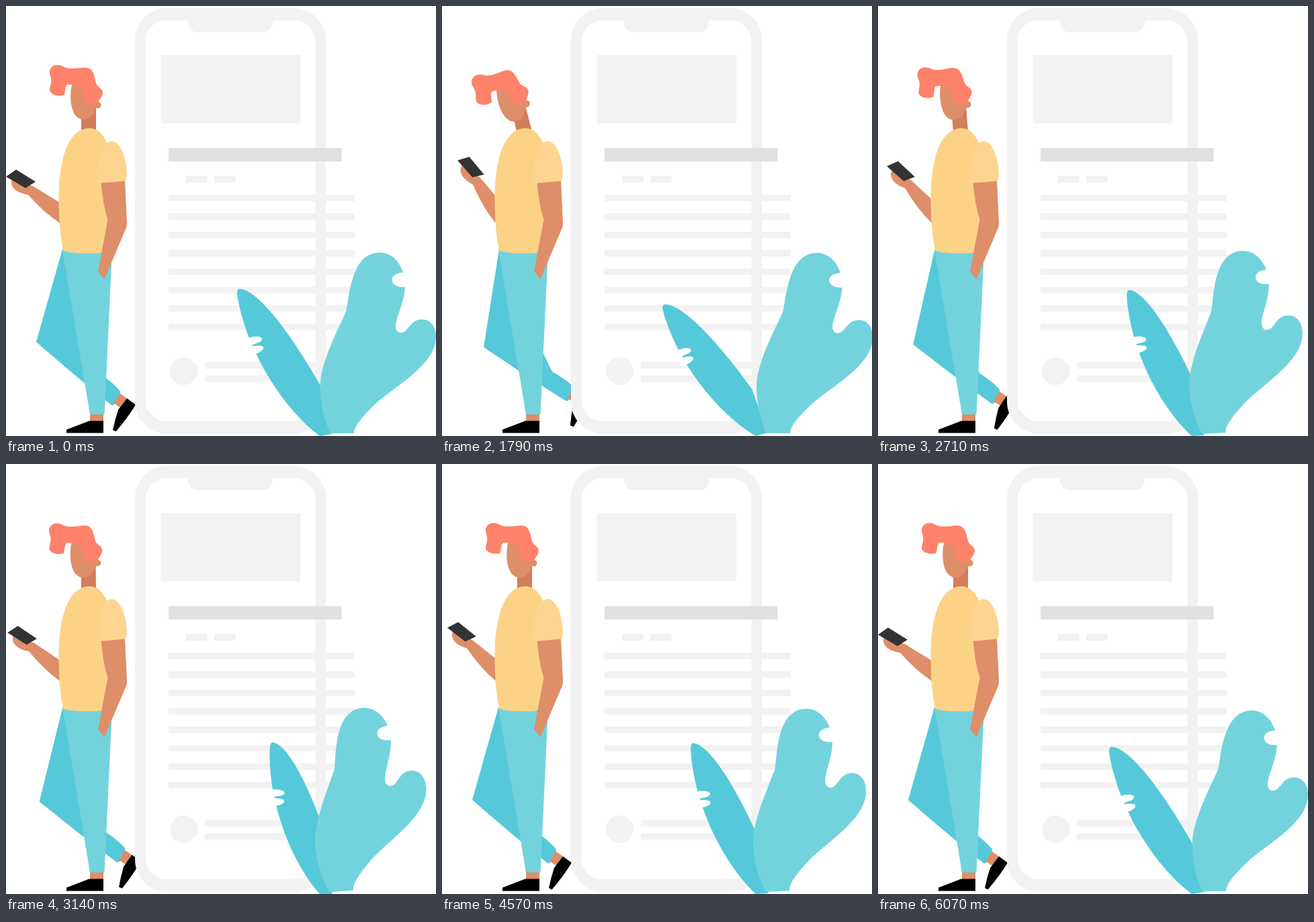
These frames come from a looping animation (640 by 640 pixels, 7.21 s). An HTML page:

```html
<!DOCTYPE html>
<html lang="en">
<head>
<meta charset="utf-8">
<title>Walking with a phone</title>
<style>
html, body { margin: 0; width: 100%; height: 100%; overflow: hidden; background: #fff; }
svg { display: block; width: 100%; height: 100%; }
.skin { fill: #de8e68; }
.teal { fill: #55c9d9; }
.aqua { fill: #73d3dd; }
.grey { fill: #f2f2f2; }
.white { fill: #fff; }
</style>
</head>
<body>
<svg viewBox="0 0 640 640">
  <g id="leg">
    <path class="teal" d="M84 362L45 500Q95 544 147 586L157 594Q160 595 162 592L170 576Q171 574 168 571Q158 560 141.500 548L128 508L119 361Z"/>
    <path class="skin" d="M169.500 576.500L181 585L172 599L160 591Z"/>
    <path d="M180 584L193 593.500Q181 613 163.500 633.500L159 631Q162 616 167 601Z"/>
  </g>

  <g class="grey">
    <rect x="192" y="3" width="284" height="634" rx="48"/>
    <rect class="white" x="207.500" y="21.500" width="253" height="596.500" rx="31"/>
    <path d="M267 20Q271 21 271 24Q272 39 287 39H381Q396 39 397 24Q397 21 401 20Z"/>
    <rect x="230.500" y="73" width="207.500" height="101.500"/>
    <rect x="268" y="253" width="31.500" height="10"/>
    <rect x="310" y="253" width="31.500" height="10"/>
    <g id="lines"></g>
    <circle cx="264.500" cy="543.500" r="20.500"/>
    <rect x="296" y="530" width="174" height="9.500"/>
    <rect x="296" y="550" width="174" height="9.500"/>
  </g>
  <rect x="242" y="211.500" width="257.500" height="20" fill="#e0e0e0"/>

  <g id="arm">
    <path class="skin" d="M9 258C5 268 14 278 33 281Q56 307 80 323L105 335L110 308L79 292L40 268Z"/>
    <path fill="#333" d="M0 254L15 243.500L44 261.500L29 271Z"/>
  </g>

  <path class="aqua" d="M84 362H150L157 384L146.500 608H125Z"/>
  <path class="skin" d="M125 608H145V618H125Z"/>
  <path d="M90 635.500V630.500L124 617.500H145V635.500Z"/>

  <g id="head">
    <path fill="#d27d5c" d="M112 145H134V191H112Z"/>
    <circle class="skin" cx="136.500" cy="147.500" r="5"/>
    <path class="skin" d="M99 114C94 130 94 168 115 169C128 169 134 156 134 145V115Z"/>
    <path fill="#fe826a" d="M65 97C67 87 78 85 87 91C97 95 108 92 118 91.500C132 92 131 107 135 117C138 122 144 123 144 129C143 136 139 139 137 143C131 147 117 146 115 138C118 126 113 121 106 119L98 117H91C88 120 88 127 87 132C80 136 64 132 65 124C66 117 68 116 67 107C65 102 65 100 65 97Z"/>
  </g>

  <path fill="#fcd386" d="M124 182C93 182 78.500 227 78.500 285C78.500 320 81 345 85 364C98 369 130 369 143 367L152 318V210C147 192 137 182 124 182Z"/>
  <path class="skin" d="M141.500 262L177 259L180 322Q180 328 179 330L146.500 406.500L137 395L151.500 318Q144 295 141.500 262Z"/>
  <path fill="#fdd591" d="M157 201C143 202 135 228 136 264Q158 262 177 260.500Q180 258 180 250C179 220 168 201 157 201Z"/>

  <g id="leafL">
    <path class="teal" d="M344 428C344 422 346 421 348 421C376 422 428 494 469 567L486 637L467 640C428 611 392 561 371 515L361 492C354 473 346 447 344 428Z"/>
    <path class="white" d="M354 494H361C367 492 374 491 379 493C383 495 381 499 376 501Q370 503 365 505H356Z"/>
    <path class="white" d="M362 507L366 506.500Q374 505 381 506Q385 508 382 512Q378 516 372 517.500L362 519Z"/>
  </g>
  <g id="leafR">
    <path class="aqua" d="M483 636C470 610 464 570 470 545C478 512 492 486 506 455C511 435 513 367 556 367C580 367 595 392 594 418C593 440 582 460 580 474C579 486 587 489 594 484C602 477 605 467 618 466.500C632 466 640 477 640 492C640 537 573 568 545 597C531 611 518 625 518 636Z"/>
    <path class="white" d="M600 396.500H594C582 396.500 574.500 401 574.500 407.500C574.500 414 581 419 594 418.500H600Z"/>
  </g>
</svg>
<script>
const LOOP = 7210;
const $ = id => document.getElementById(id);

for (let i = 0; i < 8; i++) {
  $('lines').innerHTML += `<rect x="242" y="${281 + i * 27.45}" width="277" height="9.5"/>`;
}

// Eased progress from 0 to 1 between two times.
function ease(t, from, to) {
  const x = Math.min(1, Math.max(0, (t - from) / (to - from)));
  return (1 - Math.cos(Math.PI * x)) / 2;
}

// Rises from a to b, holds until c, falls back by d.
const swing = (t, a, b, c, d) => ease(t, a, b) - ease(t, c, d);

function turn(id, x, y, angle, size = 1) {
  $(id).setAttribute('transform',
    `translate(${x} ${y}) rotate(${angle}) scale(${size}) translate(${-x} ${-y})`);
}

function draw(t) {
  turn('head', 123, 188, -16.3 * swing(t, 0, 1365, 1365, 3400));
  turn('arm', 87, 314,
    18.2 * swing(t, 0, 830, 2180, 3410) + 7 * swing(t, 4000, 4580, 4580, 5850));
  turn('leg', 119, 361,
    -3.4 * swing(t, 0, 830, 1390, 2400) - 4.8 * swing(t, 0, 830, 1390, 4500));
  turn('leafL', 467, 640,
    11.6 * swing(t, 1930, 3200, 3200, 6070) - 7.3 * swing(t, 1390, 1930, 1930, 3200),
    1 - 0.053 * swing(t, 1390, 1930, 3200, 5900));
  turn('leafR', 500, 648,
    0.5 * swing(t, 1390, 1930, 1930, 3350) - 5.5 * swing(t, 1930, 3350, 3350, 6070));
}

const start = performance.now();
function frame() {
  draw((performance.now() - start) % LOOP);
  requestAnimationFrame(frame);
}
draw(0);
requestAnimationFrame(frame);
</script>
</body>
</html>
```
